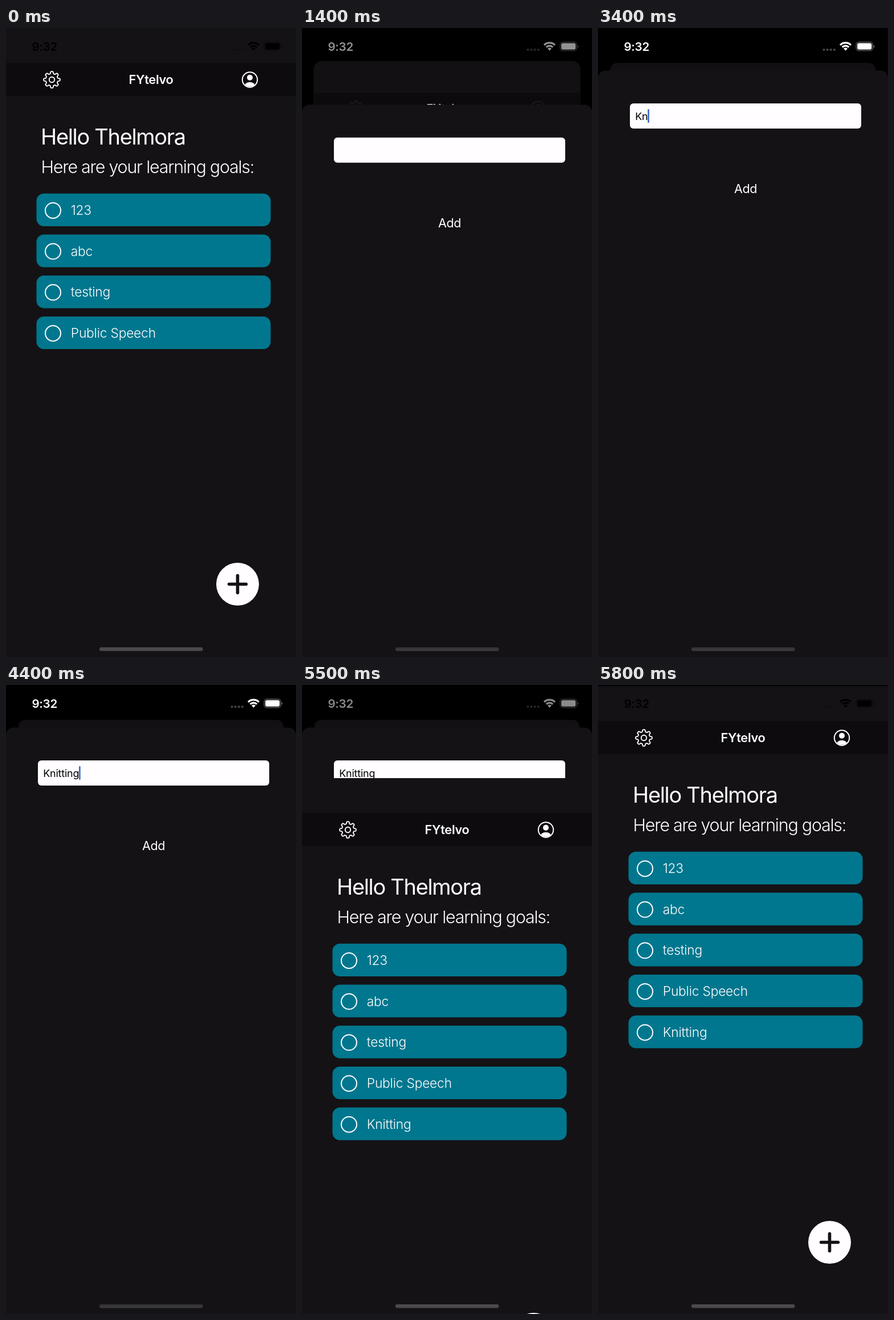
Animation, 509 px wide and 1101 px high, one loop 5900 ms. Source, as an HTML page with a canvas:

```html
<!DOCTYPE html>
<html lang="en">
<head>
<meta charset="utf-8">
<title>Learning goals</title>
<style>
  html, body { margin: 0; height: 100%; overflow: hidden; background: #000; }
  canvas { display: block; width: 509px; height: 1101px; }
</style>
</head>
<body>
<canvas id="stage" width="509" height="1101"></canvas>
<script>
const ctx = document.getElementById('stage').getContext('2d');
const W = 509, H = 1101, LOOP = 5900, STEP = 100;
const BG = '#141215', WHITE = '#fffdff', TEAL = '#00778e', DIMMED = 'rgba(66,66,70,.38)';
const GOALS = ['123', 'abc', 'testing', 'Public Speech', 'Knitting'];
const KEY_TIMES = [3100, 3400, 3600, 3800, 4000, 4100, 4200, 4400];

const mix = (a, b, p) => a + (b - a) * p;
const ramp = (t, start, length) => Math.min(1, Math.max(0, (t - start) / length));

// Critically damped spring from 0 to 1
function spring(t, start) {
  const x = Math.max(0, t - start) * 0.0174;
  return x > 11 ? 1 : 1 - (1 + x) * Math.exp(-x);
}

function box(x, y, w, h, radius, color) {
  ctx.beginPath();
  ctx.roundRect(x, y, w, h, radius);
  ctx.fillStyle = color;
  ctx.fill();
}

function disc(x, y, r, color) {
  ctx.beginPath();
  ctx.arc(x, y, r, 0, 7);
  ctx.fillStyle = color;
  ctx.fill();
}

function ring(x, y, r, width, color) {
  ctx.beginPath();
  ctx.arc(x, y, r, 0, 7);
  ctx.lineWidth = width;
  ctx.strokeStyle = color;
  ctx.stroke();
}

function text(str, x, y, size, weight, color, tracking = -0.015, align = 'left') {
  ctx.font = `${weight} ${size}px Inter, sans-serif`;
  ctx.letterSpacing = size * tracking + 'px';
  ctx.textAlign = align;
  ctx.fillStyle = color;
  ctx.fillText(str, x, y);
  return ctx.measureText(str).width;
}

function gear(x, y, color) {
  ctx.beginPath();
  for (let i = 0; i < 160; i++) {
    const a = i / 160 * 2 * Math.PI;
    const r = 12.5 + 1.9 * Math.tanh(2.2 * Math.cos(8 * a));
    ctx.lineTo(x + r * Math.sin(a), y - r * Math.cos(a));
  }
  ctx.closePath();
  ctx.lineWidth = 1.9;
  ctx.lineJoin = 'round';
  ctx.strokeStyle = color;
  ctx.stroke();
  ring(x, y, 4.7, 1.9, color);
}

function profile(x, y, color) {
  ring(x, y, 13.2, 2, color);
  disc(x, y - 3.8, 5, color);
  ctx.save();
  ctx.beginPath();
  ctx.arc(x, y, 12.2, 0, 7);
  ctx.clip();
  ctx.beginPath();
  ctx.ellipse(x, y + 11.5, 9.6, 7.3, 0, 0, 7);
  ctx.fill();
  ctx.restore();
}

function plusButton(x, y) {
  disc(x, y, 37.5, WHITE);
  box(x - 17.7, y - 2.8, 35.4, 5.6, 2.8, BG);
  box(x - 2.8, y - 17.7, 5.6, 35.4, 2.8, BG);
}

function mainScreen(goalCount, tint) {
  box(0, 0, W, H, 0, BG);
  box(0, 61, W, 57.5, 0, '#0d0b0e');
  gear(80.5, 90.5, tint);
  text('FYtelvo', W / 2, 98, 21.8, 600, WHITE, -0.015, 'center');
  profile(428, 90.5, tint);
  text('Hello Thelmora', 61, 204, 38, 400, WHITE, -0.035);
  text('Here are your learning goals:', 61.5, 254, 30.4, 300, WHITE, -0.04);
  GOALS.slice(0, goalCount).forEach((goal, i) => {
    const y = 289.8 + i * 71.7;
    box(53.5, y, 411, 57.2, 13, TEAL);
    ring(82.5, y + 29.6, 13.5, 2, tint);
    text(goal, 113.8, y + 37.2, 22.8, 300, WHITE, -0.01);
  });
  plusButton(406.5, 973.5);
}

// Main screen shrinking into a card behind the sheet
function backCard(p) {
  const scale = mix(1, 466 / W, p);
  ctx.save();
  ctx.translate(W / 2 * (1 - scale), 61 * p);
  ctx.scale(scale, scale);
  ctx.beginPath();
  ctx.roundRect(0, 0, W, H, mix(61, 14, p));
  ctx.clip();
  mainScreen(4, p > 0 ? DIMMED : WHITE);
  box(0, 0, W, H, 0, `rgba(0,0,0,${0.11 * p})`);
  ctx.restore();
}

function sheet(p, t) {
  const typed = GOALS[4].slice(0, KEY_TIMES.filter(k => t >= k).length);
  ctx.save();
  ctx.translate(0, mix(H, 74.5, p));
  box(0, 0, W, H, [13, 13, 0, 0], BG);
  box(56, 57.5, 406, 44, 6, WHITE);
  const width = text(typed, 65.2, 86, 17.9, 400, '#000', -0.01);
  if (t >= 2700 && t < 5000) {
    ctx.globalAlpha = t < 4900 ? 1 : 0.5;
    box(65 + width, 67.5, 2.6, 24, 1.3, '#3567cf');
    ctx.globalAlpha = 1;
  }
  text('Add', W / 2 + 4.5, 214.5, 21.6, 400, WHITE, -0.02, 'center');
  ctx.restore();
}

function statusBar(level) {
  const v = Math.round(255 * level), color = `rgb(${v},${v},${v})`;
  text('9:32', 45.5, 40, 20.6, 600, color);

  ctx.globalAlpha = 0.28;
  for (let i = 0; i < 4; i++) disc(396.5 + i * 6.1, 38, 2.1, color);
  ctx.globalAlpha = 1;

  ctx.strokeStyle = color;
  ctx.lineWidth = 3.3;
  for (const r of [13.4, 8.1]) {
    ctx.beginPath();
    ctx.arc(434.5, 39.3, r, -Math.PI * 0.75, -Math.PI * 0.25);
    ctx.stroke();
  }
  ctx.beginPath();
  ctx.moveTo(434.5, 39.7);
  ctx.arc(434.5, 39.3, 4.8, -Math.PI * 0.75, -Math.PI * 0.25);
  ctx.fillStyle = color;
  ctx.fill();

  ctx.globalAlpha = 0.4;
  ctx.beginPath();
  ctx.roundRect(453.2, 24.7, 29, 15, 4.5);
  ctx.lineWidth = 1.3;
  ctx.stroke();
  box(483.6, 30, 1.7, 4.6, [0, 2, 2, 0], color);
  ctx.globalAlpha = 1;
  box(455.1, 26.6, 25.2, 11.2, 2.8, color);
}

function homeIndicator(dark) {
  const shade = ctx.createLinearGradient(164, 1084, 164, 1091);
  shade.addColorStop(0, dark ? '#2f2e31' : '#4a494b');
  shade.addColorStop(1, dark ? '#403f42' : '#4a494b');
  box(164, 1084, 181.5, 6.6, 3.3, shade);
}

function draw(t) {
  const present = spring(t, 1138), push = spring(t, 5305.2);
  box(0, 0, W, H, 0, '#000');
  if (t < 1100) {
    mainScreen(4, WHITE);
  } else {
    backCard(present);
    sheet(present, t);
  }
  if (push > 0) {
    ctx.save();
    ctx.translate(0, Math.round(H * (1 - push)));
    mainScreen(5, WHITE);
    ctx.restore();
  }
  statusBar(ramp(t, 1200, 350) * (1 - ramp(t, 5300, 440)));
  homeIndicator(t >= 1200 && t < 5200);
}

function tick() {
  const t = performance.now() % LOOP;
  draw(Math.floor(t / STEP) * STEP);
  requestAnimationFrame(tick);
}
tick();
</script>
</body>
</html>
```
